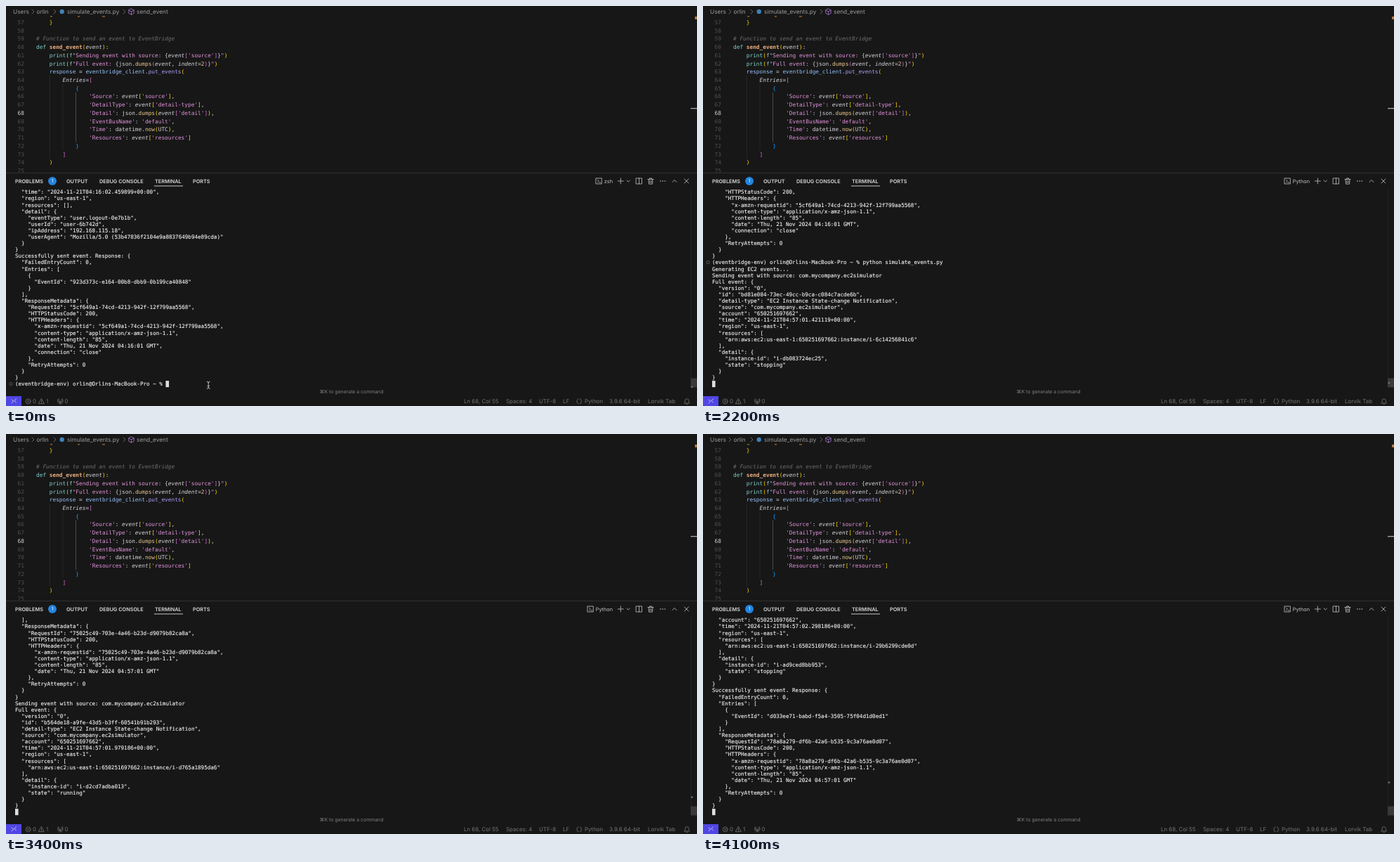
Recreate the animation shown at these times as an HTML page. Size 984 by 569 pixels, loop 4.2 s.

```html
<!DOCTYPE html>
<html lang="en">
<head>
<meta charset="utf-8">
<title>Terminal session</title>
<style>
html, body { margin: 0; width: 100%; height: 100%; overflow: hidden; background: #171717; }
svg { display: block; }
text { white-space: pre; text-rendering: geometricPrecision; }
.code { font: 7.8px "DejaVu Sans Mono", monospace; }
.term { font: 7.58px "DejaVu Sans Mono", monospace; fill: #f2f2f2; stroke: #f2f2f2; stroke-width: .12; }
.ui { font-family: Inter, sans-serif; }
.icon { fill: none; stroke-width: .8; stroke-linecap: round; stroke-linejoin: round; }
</style>
</head>
<body>
<svg id="stage" width="984" height="569" viewBox="0 0 984 569">
  <defs>
    <clipPath id="editorClip"><rect y="15.5" width="984" height="221"/></clipPath>
  </defs>
</svg>
<script>
const stage = document.getElementById('stage');
const LOOP = 4200;

function add(name, attrs, parent = stage) {
  const node = document.createElementNS('http://www.w3.org/2000/svg', name);
  for (const key in attrs) node.setAttribute(key, attrs[key]);
  parent.appendChild(node);
  return node;
}
const rect = (x, y, width, height, fill) => add('rect', { x, y, width, height, fill });
const icon = (d, stroke, parent) => add('path', { d, stroke, class: 'icon' }, parent);
function label(x, y, text, size, fill, attrs = {}) {
  const node = add('text', { x, y, class: 'ui', 'font-size': size, fill, ...attrs });
  node.textContent = text;
  return node;
}

// ---- Editor ----
const tone = {
  w: '#d6d6dd', k: '#82d2ce', F: '#efb080', s: '#e394dc', v: '#94c1fa', c: '#aaa0fa',
  n: '#ebc88d', p: '#d6d6dd', q: '#6d6d6d', y: '#ffd700', m: '#da70d6', b: '#179fff'
};
const entry = (key, rest) => `w                ~s'${key}'~w: ~${rest}`;
const code = [
  'y    }', '',
  'q# Function to send an event to EventBridge',
  'kdef ~Fsend_event~y(~pevent~y)~w:',
  `w    ~kprint~y(~kf~s"Sending event with source: ~w{~pevent~m[~s'source'~m]~w}~s"~y)`,
  'w    ~kprint~y(~kf~s"Full event: ~w{~wjson.~ndumps~m(~pevent~w, ~pindent~w=~n2~m)~w}~s"~y)',
  'w    ~vresponse ~w= ~veventbridge_client~w.~cput_events~y(',
  'w        ~pEntries~w=~m[',
  'b            {',
  entry('Source', "pevent~y[~s'source'~y]~w,"),
  entry('DetailType', "pevent~y[~s'detail-type'~y]~w,"),
  entry('Detail', "wjson.~ndumps~y(~pevent~m[~s'detail'~m]~y)~w,"),
  entry('EventBusName', "s'default'~w,"),
  entry('Time', 'wdatetime.~nnow~y(~wUTC~y)~w,'),
  entry('Resources', "pevent~y[~s'resources'~y]"),
  'b            }',
  'm        ]',
  'y    )', ''
];
const editor = add('g', { class: 'code', 'clip-path': 'url(#editorClip)' });
const rowH = 11.72;

[[62.3, 99.5, 217], [81, 111, 205]].forEach(([x, top, end]) =>
  icon(`M${x} ${top}V${end}`, '#2c2c2c', editor));
icon('M99.5 123V193', '#5a5a5a', editor);

code.forEach((line, i) => {
  const y = 26 + i * rowH, num = 57 + i;
  add('text', { x: 26, y, 'text-anchor': 'end', fill: num === 68 ? '#d0d0d0' : '#505050' }, editor)
    .textContent = num;
  const row = add('text', { x: 43, y }, editor);
  for (const part of line.split('~')) {
    if (!part) continue;
    const span = add('tspan', { fill: tone[part[0]] }, row);
    if (part[0] === 'p' || part[0] === 'q') span.setAttribute('font-style', 'italic');
    if (part[0] === 'F') span.setAttribute('font-weight', 'bold');
    span.textContent = part.slice(1);
  }
});

// Remains of the line hidden under the breadcrumb
[[63, 3], [102, 3], [137, 4]].forEach(([x, w]) => rect(x, 14.3, w, 1.2, '#a8733c'));
rect(981, 15, 3, 4, '#b8763d');
rect(975, 145, 9, 1.3, '#a8a8a8');

// ---- Breadcrumb ----
const crumb = '#9b9b9b';
[[10, 'Users'], [43.5, 'orlin'], [87, 'simulate_events.py'], [186, 'send_event']]
  .forEach(([x, text]) => label(x, 11, text, 8.3, crumb));
[37, 68, 167].forEach(x => icon(`M${x} 5l3 3-3 3`, '#7c7c7c'));
add('circle', { cx: 79.7, cy: 8, r: 3.2, fill: '#3f83b8' });
icon('M178.5 4l3.7 2v4.3l-3.7 2-3.7-2V6zM174.8 6l3.7 2 3.7-2M178.5 8v4.3', '#a97bd0');

// ---- Panel header ----
rect(0, 237, 984, 1, '#303030');
[[13, 'PROBLEMS'], [86, 'OUTPUT'], [133, 'DEBUG CONSOLE'], [212, 'TERMINAL'], [266, 'PORTS']]
  .forEach(([x, text]) => label(x, 251.7, text, 7.3, '#d8d8d8', { 'font-weight': 600 }));
rect(211, 255.5, 41, 1, '#c8c8c8');
add('circle', { cx: 66, cy: 249, r: 6, fill: '#2385e0' });
label(66, 251.4, '1', 6.6, '#fff', { 'text-anchor': 'middle' });

const tool = '#c4c4c4';
const shellIcon = icon('M-4 -4H4V4H-4ZM-2 -2l2 2-2 2M.5 2H2.5', tool);
const shellName = label(864, 251.8, 'zsh', 7.3, tool, { 'text-anchor': 'end' });
[
  'M875.3 245v8M871.3 249h8', 'M884 248l2.2 2.2 2.2-2.2',
  'M897.5 245h8v8h-8zM901.5 245v8',
  'M914 246.5h8M916.5 246.5v-1.5h3v1.5M915 246.5l.5 6.7h5l.5-6.7M917 248.5v3M919 248.5v3',
  'M949 250.5l3-3 3 3', 'M966 246l6 6M972 246l-6 6'
].forEach(d => icon(d, tool));
[932, 935.2, 938.4].forEach(cx => add('circle', { cx, cy: 249, r: .8, fill: tool }));

// ---- Terminal text ----
let seed = 7;
const hexDigit = () => (seed = seed * 16807 % 2147483647) % 16;
const hex = n => Array.from({ length: n }, () => hexDigit().toString(16)).join('');
const uuid = () => [8, 4, 4, 4, 12].map(hex).join('-');

function response(eventId, requestId, date, close) {
  return [
    'Successfully sent event. Response: {',
    '  "FailedEntryCount": 0,',
    '  "Entries": [',
    '    {',
    `      "EventId": "${eventId}"`,
    '    }',
    '  ],',
    '  "ResponseMetadata": {',
    `    "RequestId": "${requestId}",`,
    '    "HTTPStatusCode": 200,',
    '    "HTTPHeaders": {',
    `      "x-amzn-requestid": "${requestId}",`,
    '      "content-type": "application/x-amz-json-1.1",',
    '      "content-length": "85",',
    `      "date": "Thu, 21 Nov 2024 04:${date} GMT"${close ? ',' : ''}`,
    ...(close ? ['      "connection": "close"'] : []),
    '    },',
    '    "RetryAttempts": 0',
    '  }',
    '}'
  ];
}

function ec2Event(id, time, arn, instance, state) {
  return [
    'Sending event with source: com.mycompany.ec2simulator',
    'Full event: {',
    '  "version": "0",',
    `  "id": "${id}",`,
    '  "detail-type": "EC2 Instance State-change Notification",',
    '  "source": "com.mycompany.ec2simulator",',
    '  "account": "650251697662",',
    `  "time": "2024-11-21T04:57:${time}+00:00",`,
    '  "region": "us-east-1",',
    '  "resources": [',
    `    "arn:aws:ec2:us-east-1:650251697662:instance/i-${arn}"`,
    '  ],',
    '  "detail": {',
    `    "instance-id": "i-${instance}",`,
    `    "state": "${state}"`,
    '  }',
    '}'
  ];
}

const prompt = '(eventbridge-env) orlin@Orlins-MacBook-Pro ~ % ';
const command = 'python simulate_events.py';
const PROMPT_ROW = 30;
const lines = [
  '  "time": "2024-11-21T04:16:02.459899+00:00",',
  '  "region": "us-east-1",',
  '  "resources": [],',
  '  "detail": {',
  '    "eventType": "user.logout-0e7b1b",',
  '    "userId": "user-6b742d",',
  '    "ipAddress": "192.168.115.18",',
  '    "userAgent": "Mozilla/5.0 (53b47836f2104e9a8837649b94e89cda)"',
  '  }',
  '}',
  ...response('923d373c-e164-00b8-dbb9-0b199ca40848',
    '5cf649a1-74cd-4213-942f-12f799aa5568', '16:01', true),
  prompt + command
];

// Each step: time in ms, lines printed above the cursor from then on
const TYPED = 300, ENTER = 1500;
const steps = [[0, PROMPT_ROW], [ENTER, lines.length]];
function print(time, output) {
  lines.push(...output);
  steps.push([time, lines.length]);
}

print(2200, ['Generating EC2 events...', ...ec2Event('bd81e084-73ec-49cc-b9ca-c084c7acde6b',
  '01.421119', '6c14256841c6', 'db083724ec25', 'stopping')]);
print(2900, response('ae3dd7ac-65dc-cbf7-1e4c-87f058ae833e',
  '0ea480a4-82e0-45f2-bd82-b3b184b06214', '57:00'));
print(3100, ec2Event(uuid(), '01.819402', hex(12), hex(12), 'running'));
print(3200, response(uuid(), '75025c49-703e-4a46-b23d-d9079b82ca8a', '57:01'));
print(3400, ec2Event('b564de18-a9fe-43d5-b3ff-60541b91b293',
  '01.979186', 'd765a1895da6', 'd2cd7adba013', 'running'));
print(3500, response(uuid(), '829492b7-511e-44c8-825f-e8784126a37f', '57:01'));
print(3700, ec2Event('9e6bac17-3035-4879-abaa-540bc3cd5880',
  '02.138690', '5edba20e4924', '33d7ab0cb43a', 'terminated'));
print(3800, response(uuid(), uuid(), '57:01'));
print(4000, ec2Event(uuid(), '02.298186', '29b6299cde0d', 'ad9ced8bb953', 'stopping'));
print(4100, response('d033ee71-babd-f5a4-3505-75f04d1d0ed1',
  '78a8a279-df6b-42a6-b535-9c3a76ae0d07', '57:01'));

// ---- Terminal view ----
const TOP = 260.1, LINE = 9.1, CELL = 4.563, LEFT = 13;
rect(975, 260, .8, 283, '#272727');
rect(975, 529.5, 9, 13, '#393939');
const mark = rect(975.5, 0, 2.6, 2.4, '#6c6c6c');
const rows = Array.from({ length: 31 }, (_, i) =>
  add('text', { class: 'term', x: LEFT, y: TOP + i * LINE + 7.2 }));
const dot = add('circle', { cx: 7, r: 2.1, fill: 'none', stroke: '#686868', 'stroke-width': .8 });
const caret = rect(0, TOP + 30 * LINE, 4.6, 9.1, '#dedede');
const pointer = icon('M286.2 534.2Q288.2 534.2 288.2 536V542.5Q288.2 544.3 286.2 544.3' +
  'M290.2 534.2Q288.2 534.2 288.2 536M288.2 542.5Q288.2 544.3 290.2 544.3M287 540.5h2.4', '#e0e0e0');

label(492, 550.5, '⌘K to generate a command', 6.9, '#808080', { 'text-anchor': 'middle' });

// ---- Status bar ----
const dim = '#757575';
rect(0, 555, 22, 14, '#5046e4');
icon('M8 560l2.8 2.3L8 564.8M14.5 559l-2.8 2.4 2.8 2.5', '#dcdcf8');
add('circle', { cx: 31.7, cy: 562.4, r: 3.5, stroke: dim, class: 'icon' });
icon('M30.3 561l2.8 2.8M33.1 561l-2.8 2.8M50.5 558.7l3.9 7h-7.8zM50.5 561.2v2M50.5 564.4v.2', dim);
icon('M77.3 562v4M75.6 566l1.7-4 1.7 4M75.5 563.3q-1.2-1.8 0-3.6M79.1 563.3q1.2-1.8 0-3.6' +
  'M74.2 564.2q-1.7-2.7 0-5.4M80.4 564.2q1.7-2.7 0-5.4', dim);
[
  [38, '0'], [57, '1'], [83.5, '0'], [652, 'Ln 68, Col 55'], [712, 'Spaces: 4'], [759, 'UTF-8'],
  [793, 'LF'], [824, 'Python'], [859, '3.9.6 64-bit'], [914, 'Lorvik Tab']
].forEach(([x, text]) => label(x, 565.4, text, 7.9, dim));
icon('M815 559q-1.5 0-1.5 1.6t-1 1.7q1 .2 1 1.8t1.5 1.6M817.5 559q1.5 0 1.5 1.6t1 1.7q-1 .2-1 1.8t-1.5 1.6', dim);
icon('M966 565h7.4l-1-1.6v-2q0-2.6-2.7-2.6t-2.7 2.6v2zM968.8 566.4h1.8', dim);

// ---- Playback ----
let shown = '';
function draw(time) {
  const printed = steps.filter(step => step[0] <= time).pop()[1];
  const typed = time >= TYPED, entered = time >= ENTER;
  const state = `${printed} ${typed}`;
  if (state === shown) return;
  shown = state;

  const scroll = printed - PROMPT_ROW;
  rows.forEach((row, i) => {
    const n = i + scroll;
    row.textContent = n === PROMPT_ROW && !typed ? prompt
      : n < printed || n === PROMPT_ROW ? lines[n] : '';
  });

  const column = entered ? 0 : prompt.length + (typed ? command.length : 0);
  caret.setAttribute('x', LEFT + column * CELL);
  pointer.style.display = typed ? 'none' : '';
  dot.style.display = scroll > PROMPT_ROW ? 'none' : '';
  dot.setAttribute('cy', TOP + (PROMPT_ROW - scroll + .5) * LINE);
  mark.setAttribute('y', 258.6 + 282 * 930 / (930 + scroll));

  shellName.textContent = entered ? 'Python' : 'zsh';
  shellIcon.setAttribute('transform', `translate(${entered ? 832.3 : 844.3} 249)`);
}

function tick() {
  draw(performance.now() % LOOP);
  requestAnimationFrame(tick);
}
tick();
</script>
</body>
</html>
```
